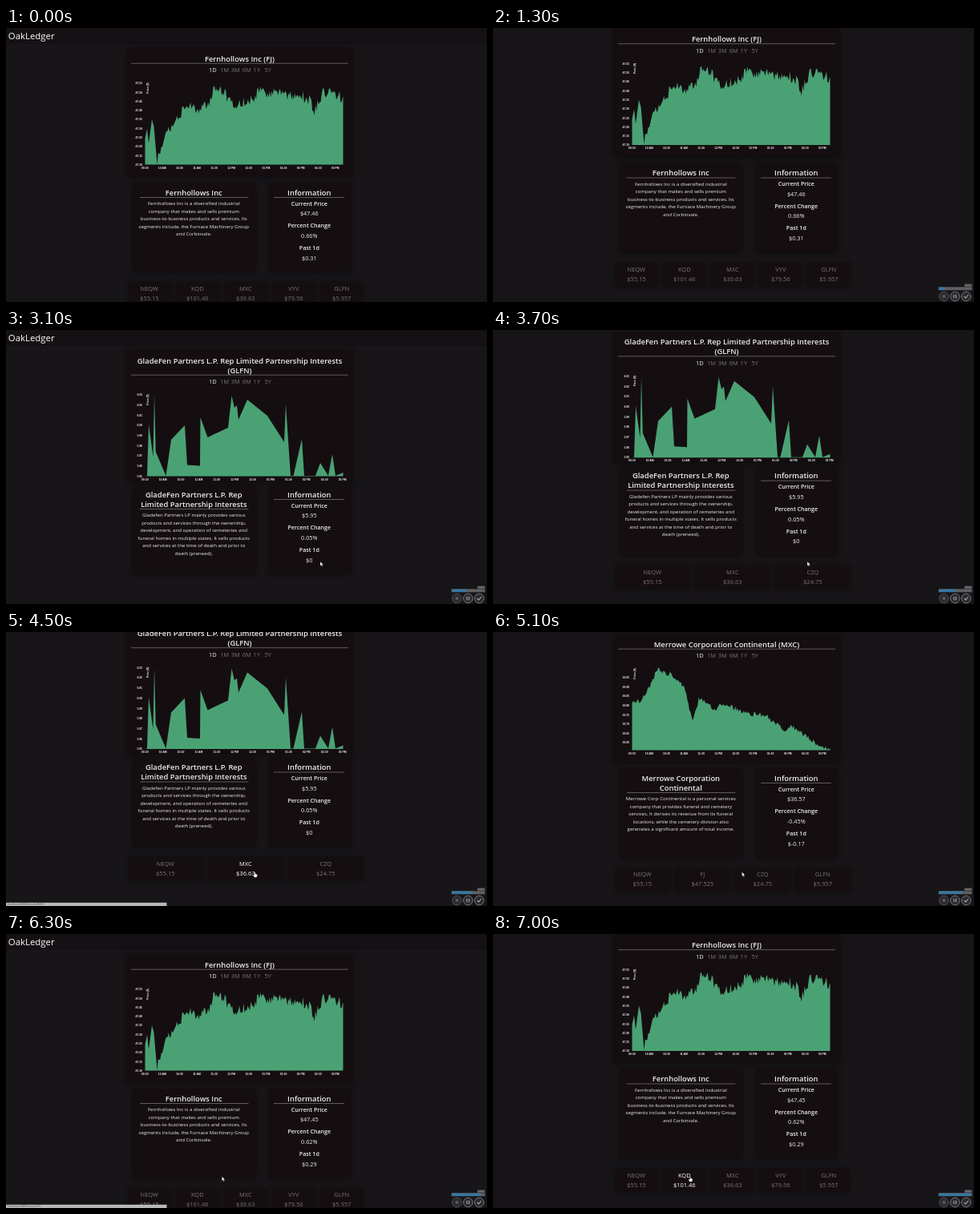
Animation, 600 px wide and 342 px high, one loop 7.1 s. Source, as an HTML page:

```html
<!DOCTYPE html>
<html lang="en">
<head>
<meta charset="utf-8">
<title>Stock page</title>
<style>
html, body { margin: 0; width: 100%; height: 100%; overflow: hidden; background: #171518; }
svg { display: block; width: 100vw; height: 100vh; }
text { font-family: "Open Sans", "Noto Sans", sans-serif; fill: #eee; }
.card { fill: #150e11; filter: drop-shadow(0 1px 3px rgba(0, 0, 0, .5)); }
.mid { text-anchor: middle; }
.brand { font-size: 11.4px; fill: #fff; }
.head { font-size: 9.4px; font-weight: 600; }
.label { font-size: 7.1px; font-weight: 600; }
.value { font-size: 7.3px; }
.body { font-size: 6.1px; }
.range { font-size: 7.5px; }
.dim, .tile text { fill: #757376; }
.tile text { font-size: 7.5px; }
.tile.on text { fill: #fff; }
.axis { font: bold 3.4px "Liberation Sans", sans-serif; fill: #f4f4f4; }
.rule { stroke: #7d7a7d; stroke-width: .7; }
.link { font-size: 3.7px; fill: #555; }
</style>
</head>
<body>
<svg id="stage" viewBox="0 0 600 342"></svg>
<script>
const LOOP = 7100;
const NS = 'http://www.w3.org/2000/svg';
const stage = document.getElementById('stage');

function add(parent, tag, attrs, text) {
  const el = document.createElementNS(NS, tag);
  for (const k in attrs) el.setAttribute(k, attrs[k]);
  if (text !== undefined) el.textContent = text;
  parent.appendChild(el);
  return el;
}
const group = parent => add(parent, 'g', {});
const write = (g, cls, x, y, s) => add(g, 'text', { class: cls, x, y }, s);
const rule = (g, x1, x2, y) => add(g, 'line', { class: 'rule', x1, x2, y1: y, y2: y });
const rect = (g, x, y, width, height, fill) => add(g, 'rect', { x, y, width, height, fill });
const card = (g, x, y, width, height) => add(g, 'rect', { class: 'card', x, y, width, height, rx: 1.5 });
const show = (el, on) => { el.style.display = on ? '' : 'none'; };

const clamp = k => Math.max(0, Math.min(1, k));
const smooth = k => k * k * (3 - 2 * k);
const easeOut = k => 1 - (1 - k) ** 2;

// Value between key points of the form [position, ...values]
function at(keys, pos, ease = k => k) {
  const i = Math.max(1, keys.findIndex(key => key[0] > pos));
  const a = keys[i - 1], b = keys[i];
  const k = ease(clamp((pos - a[0]) / (b[0] - a[0])));
  return a.slice(1).map((v, j) => v + (b[j + 1] - v) * k);
}

function random(seed) {
  return () => (seed = (seed * 16807) % 2147483647) / 2147483647;
}

// Follows an outline with seeded price noise, rounded to ticks
function roughen(outline, from, size, tick, seed) {
  const rnd = random(seed), end = 420.5;
  const line = outline.filter(p => p[0] <= from);
  for (let x = from + 1.3; x < end; x += 1.3) {
    const y = at(outline, x)[0] + (rnd() - .5) * size;
    line.push([x, Math.min(170.5, Math.round(y / tick) * tick)]);
  }
  return [...line, [end, outline[outline.length - 1][1]]];
}

const fernLine = roughen([
  [173.5, 138], [176, 126], [178, 144], [182, 114], [184.5, 123], [188.5, 170], [194, 147],
  [204, 125], [214, 111], [228, 97], [240, 102], [254, 92], [258.5, 73], [270, 79], [284, 96],
  [302, 92], [316, 79], [345, 82], [375, 87], [385, 102], [395, 82], [421, 86]
], 188.5, 14, 2.8, 71);

const gladeLine = [
  [176, 182], [178, 118], [183.5, 158], [185, 81], [186.8, 152], [199.5, 182], [206, 137],
  [223, 119], [226, 168.5], [242, 169.5], [242.5, 109], [251.5, 134], [277, 122], [281.5, 82],
  [285, 97], [288, 94], [290, 112], [301, 87], [326, 107], [347, 140], [349, 93], [355, 182],
  [358.5, 182], [369, 136], [372, 182], [386, 182], [392, 166], [402, 182], [407, 155],
  [411, 182], [420.5, 178]
];

const merroweLine = roughen([
  [173.5, 112], [183, 109], [195, 93], [205, 70], [224, 77], [239, 93], [249, 136], [257, 106],
  [278, 120], [286, 111], [318, 125], [340, 127], [364, 146], [372, 140], [397, 158],
  [416, 169], [421, 168]
], 173.5, 6, .6, 19);

const pages = {
  fern: {
    title: ['Fernhollows Inc (FJ)'], name: ['Fernhollows Inc'],
    body: ['Fernhollows Inc is a diversified industrial', 'company that makes and sells premium',
      'business-to-business products and services. Its',
      'segments include, the Furnace Machinery Group', 'and Corbinvale.'],
    info: ['$47.46', '0.66%', '$0.31'], line: fernLine,
    axis: { top: 47.55, step: .05, n: 10, y: 69, dy: 11.3 }, dx: 21.6,
    tiles: ['NEQW $55.15', 'KQD $101.46', 'MXC $36.63', 'VYV $79.56', 'GLFN $5.957']
  },
  glade: {
    title: ['GladeFen Partners L.P. Rep Limited Partnership Interests', '(GLFN)'],
    name: ['GladeFen Partners L.P. Rep', 'Limited Partnership Interests'],
    body: ['Gladefen Partners LP mainly provides various', 'products and services through the ownership,',
      'development, and operation of cemeteries and', 'funeral homes in multiple states. It sells products',
      'and services at the time of death and prior to', 'death (preneed).'],
    info: ['$5.95', '0.05%', '$0'], line: gladeLine,
    axis: { top: 6.03, step: .01, n: 9, y: 81, dy: 12.7 }, dx: 22.4,
    tiles: ['NEQW $55.15', 'MXC $36.63', 'CZQ $24.75']
  },
  merrowe: {
    title: ['Merrowe Corporation Continental (MXC)'], name: ['Merrowe Corporation', 'Continental'],
    body: ['Merrowe Corp Continental is a personal services', 'company that provides funeral and cemetery',
      'services. It derives its revenue from its funeral', 'locations, while the cemetery division also',
      'generates a significant amount of total income.'],
    info: ['$36.57', '-0.45%', '$-0.17'], line: merroweLine,
    axis: { top: 36.95, step: .05, n: 8, y: 80, dy: 11.6 }, dx: 21.6,
    tiles: ['NEQW $55.15', 'FJ $47.525', 'CZQ $24.75', 'GLFN $5.957']
  }
};
pages.fernLater = { ...pages.fern, info: ['$47.45', '0.62%', '$0.29'] };

const hours = ['09:30', '10 AM', '10:30', '11 AM', '11:30', '12 PM',
  '12:30', '01 PM', '01:30', '02 PM', '02:30', '03 PM'];
const ranges = ['1D', '1M', '3M', '6M', '1Y', '5Y'];

function drawChart(g, p, shift) {
  const base = 170.5 + shift;
  ranges.forEach((s, i) => write(g, i ? 'range dim' : 'range', 253 + i * 13.9, 55 + shift, s));
  const points = [[173.5, base], ...p.line, [420.5, base]];
  add(g, 'polygon', { points: points.map(([x, y]) => x.toFixed(1) + ',' + y.toFixed(1)).join(' '), fill: '#4aa274' });
  for (let i = 0; i < p.axis.n; i++) {
    write(g, 'axis', 170, p.axis.y + i * p.axis.dy + 1.2, (p.axis.top - i * p.axis.step).toFixed(2))
      .setAttribute('text-anchor', 'end');
  }
  hours.forEach((s, i) => write(g, 'axis mid', 173.2 + i * p.dx, base + 5.3, s));
  add(g, 'text', { class: 'axis mid', transform: `translate(178.2 ${75 + shift}) rotate(-90)` }, 'Price ($)');
}

function drawPage(p) {
  const g = p.root = group(scroller);
  const shift = (p.title.length - 1) * 12, drop = (p.name.length - 1) * 12;
  card(g, 150, 25, 283, 160 + shift / 4);
  p.title.forEach((s, i) => write(g, 'head mid', 291.5, 41.5 + i * 12, s));
  rule(g, 156, 427, 44.2 + shift);
  drawChart(g, p, shift);

  card(g, 158, 193, 153, 111);
  p.name.forEach((s, i) => write(g, 'head mid', 234.3, 208.8 + i * 12, s));
  rule(g, 167, 302.5, 211.5 + drop);
  p.body.forEach((s, i) => write(g, 'body mid', 234.3, 221 + drop + i * 9.5, s));

  card(g, 328, 193, 102, 111);
  write(g, 'head mid', 378.3, 208.8, 'Information');
  rule(g, 334, 422, 211.5);
  ['Current Price', 'Percent Change', 'Past 1d'].forEach((s, i) => {
    write(g, 'label mid', 378.3, 221.5 + i * 27.7, s);
    write(g, 'value mid', 378.3, 234.2 + i * 27.7, p.info[i]);
  });

  p.row = group(g);
  const w = 300 / p.tiles.length;
  p.tileEls = p.tiles.map((s, i) => {
    const t = add(p.row, 'g', { class: 'tile' }), mid = 148.8 + w * (i + .5);
    card(t, mid - w / 2 + 4, 317, w - 8, 29.5);
    s.split(' ').forEach((part, k) => write(t, 'mid', mid, 328.4 + k * 11.7, part));
    return t;
  });
}

const scroller = group(stage);
rect(scroller, 0, 0, 600, 20, '#141014');
write(scroller, 'brand', 2.8, 14, 'OakLedger');
Object.values(pages).forEach(drawPage);

// Link preview at the lower left
const status = group(stage);
rect(status, 0, 337.8, 200.5, 4.2, '#b8b8b8');
const link = write(status, 'link', 1.5, 341.3, '');

// Recorder controls
const recorder = add(stage, 'g', { opacity: .75 });
rect(recorder, 588, 319.5, 9.5, 3.4, '#6d6d70');
rect(recorder, 589.5, 320.7, 6.5, .8, '#aaa');
rect(recorder, 555.8, 323.3, 41.7, 4, '#77787b');
const progress = rect(recorder, 556, 323.7, 1, 3.2, '#3f9bd2');
for (let i = 0; i < 3; i++) {
  add(recorder, 'circle', { cx: 562.5 + i * 13.9, cy: 335, r: 5.8, fill: '#343236', stroke: i ? '#a5a5a8' : '#6c6b6e', 'stroke-width': .9 });
}
rect(recorder, 560.8, 333.3, 3.4, 3.4, '#777');
add(recorder, 'path', { d: 'M575 332.7v4.6M577.6 332.7v4.6M587.8 335l1.9 2 3.2-4', fill: 'none', stroke: '#ddd', 'stroke-width': 1.1 });

const pointer = add(stage, 'g', { fill: '#fff', stroke: '#111', 'stroke-width': .3 });
const arrow = add(pointer, 'path', { d: 'M0 0V5.4L1.3 4.3 2.2 6.2 3.1 5.8 2.2 3.9H3.9Z' });
const hand = add(pointer, 'path', { d: 'M-.6 .4Q0-.5 .6 .4V2.4L2.9 3V5L2 6.8H-.7L-2.2 4.2-1.5 3.6-.6 4.3Z' });

// Each visit: open, load, show tiles, scroll down, hover a tile; the next visit opens on its click
const visits = [
  { page: 'fern', open: 0, load: 0, tiles: 0, scroll: [1000, 1300], depth: 24.5, hover: 1950, tile: 4 },
  { page: 'glade', open: 2400, load: 2700, tiles: 3400, scroll: [3500, 4000], depth: 36.5, hover: 4250, tile: 1 },
  { page: 'merrowe', open: 4600, load: 4700, tiles: 4800, scroll: [4800, 5200], depth: 24.5, hover: 5400, tile: 1 },
  { page: 'fernLater', open: 5700, load: 6000, tiles: 6200, scroll: [6300, 6600], depth: 24.5, hover: 6900, tile: 1 }
];
const LINK_DELAY = 150, LINK_STAY = 350;

const pointerKeys = [
  [1400, 440, 336], [1900, 419, 303], [2450, 419, 303], [3000, 392, 289], [3700, 392, 289],
  [4250, 310.5, 299.5], [5100, 310.5, 299.5], [5400, 262, 302], [5750, 262, 302],
  [6200, 269.3, 302.8], [6600, 269.3, 302.8], [6900, 246, 302.5], [LOOP, 246, 302.5]
];

function render(t) {
  const n = visits.filter(v => v.open <= t).length - 1;
  const visit = visits[n], last = visits[n - 1];
  const name = t < visit.load ? last.page : visit.page;
  const page = pages[name], hovering = t >= visit.hover;

  for (const key in pages) show(pages[key].root, key === name);
  show(page.row, t >= visit.tiles);
  page.tileEls.forEach((el, i) => el.classList.toggle('on', hovering && i === visit.tile));
  const [from, to] = visit.scroll;
  scroller.setAttribute('transform', `translate(0 ${-visit.depth * easeOut(clamp((t - from) / (to - from)))})`);

  const linked = t >= visit.hover + LINK_DELAY ? visit : last && t < visit.load + LINK_STAY ? last : null;
  show(status, !!linked);
  if (linked) link.textContent = 'localhost:3000/stocks/' + pages[linked.page].tiles[linked.tile].split(' ')[0];

  show(recorder, t >= 100);
  progress.setAttribute('width', 41.3 * t / LOOP);

  show(pointer, t >= pointerKeys[0][0]);
  pointer.setAttribute('transform', `translate(${at(pointerKeys, t, smooth).join(' ')})`);
  show(hand, hovering);
  show(arrow, !hovering);
}

const start = performance.now();
function tick() {
  const t = (performance.now() - start) % LOOP;
  render(Math.floor(t / 100) * 100);
  requestAnimationFrame(tick);
}
tick();
</script>
</body>
</html>
```
